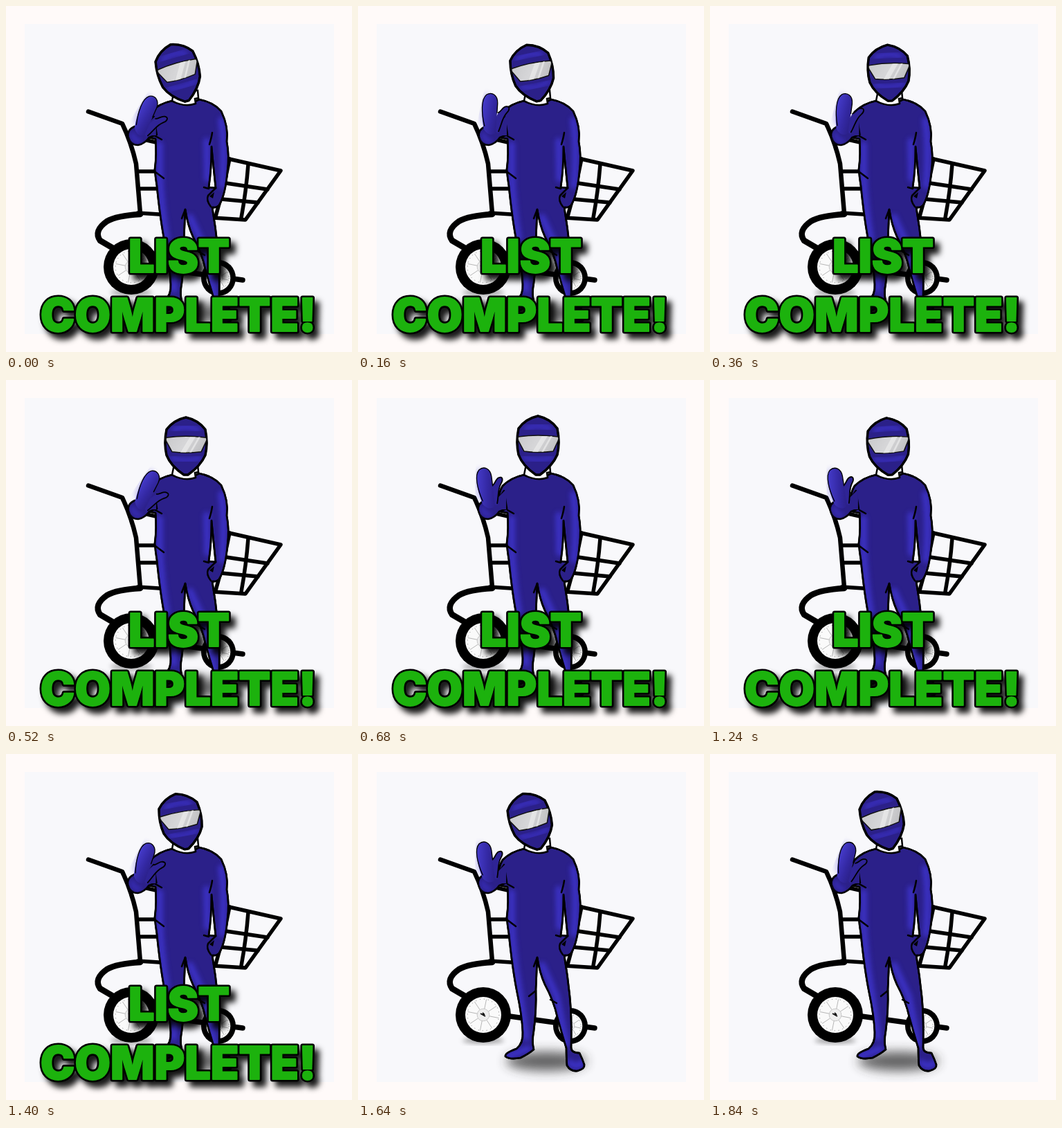
An HTML page for the animation above (1.88 s loop, 500 by 500 pixels).

```html
<!DOCTYPE html>
<html lang="en">
<head>
<meta charset="utf-8">
<title>List complete</title>
<style>
  html, body { margin: 0; width: 100%; height: 100%; overflow: hidden; background: #fffaf9; }
  svg { display: block; width: 100vw; height: 100vh; }
  .line { fill: none; stroke: #000; stroke-linecap: round; stroke-linejoin: round; }
  .suit { fill: #2b2089; stroke: #000; stroke-width: 2.6; stroke-linejoin: round; }
  .glow { fill: none; stroke: #4338dc; stroke-linecap: round; filter: url(#soft); }
  .caption { font: 900 66.5px Inter, "Open Sans", sans-serif; text-anchor: middle; stroke-linejoin: round; }
</style>
</head>
<body>
<svg viewBox="0 0 500 500">
  <defs>
    <filter id="soft" x="-50%" y="-50%" width="200%" height="200%"><feGaussianBlur stdDeviation="3.5"/></filter>
    <filter id="wide" x="-50%" y="-100%" width="200%" height="300%"><feGaussianBlur stdDeviation="8"/></filter>
    <filter id="drop" x="-10%" y="-10%" width="125%" height="130%">
      <feDropShadow dx="7" dy="8" stdDeviation="4" flood-color="#000" flood-opacity=".9"/>
    </filter>
    <linearGradient id="glass" x2="1" y2=".3">
      <stop offset="0" stop-color="#c9c9cb"/><stop offset=".55" stop-color="#d6d6d8"/><stop offset="1" stop-color="#c2c2c4"/>
    </linearGradient>
    <linearGradient id="skin" x2="1">
      <stop offset="0" stop-color="#453bcb"/><stop offset=".6" stop-color="#3328a2"/><stop offset="1" stop-color="#2b2089"/>
    </linearGradient>
    <path id="bodyShape" fill-rule="evenodd" clip-rule="evenodd" d="M240 137 Q221 141 209 153 Q202 164 203 180 L205 190 L216 192
      Q218 215 215 236 Q216 248 218 260 Q223 310 230 345 Q237 378 238 402 Q239 418 229 426
      Q212 432 213 437 Q219 442 235 439 Q247 433 254 427 Q251 416 254 400 Q258 370 257 340 L259 294
      Q263 318 270 333 Q283 357 288 380 Q294 402 301 425 Q301 440 302 450 Q307 459 317 458
      Q328 455 327 449 Q324 440 320 432 Q308 432 308 424 Q309 380 306 350 Q303 320 298 291
      Q306 292 309 286 Q317 272 320 239 Q323 216 319 196 Q322 175 311 152 Q300 139 279 135
      Q258 147 240 137Z M297 203 Q297 235 293 262 L303 263 Q300 235 297 203Z"/>
    <path id="headShape" d="M260 52 Q242 56 232 70 Q228 90 232 108 Q238 124 257 137 L263 137
      Q281 124 288 108 Q292 90 288 70 Q278 56 260 52Z"/>
    <clipPath id="bodyClip"><use href="#bodyShape"/></clipPath>
    <clipPath id="headClip"><use href="#headShape"/></clipPath>
    <g id="words">
      <text x="250" y="384.500">LIST</text>
      <text x="249" y="469.500">COMPLETE!</text>
    </g>
  </defs>

  <rect width="500" height="500" fill="#fffaf9"/>
  <rect x="27" y="26" width="447" height="448" fill="#f8f8fb"/>
  <ellipse cx="272" cy="444" rx="58" ry="14" fill="#333" opacity=".75" filter="url(#wide)"/>

  <g class="line" stroke-width="5.500">
    <path d="M119 152.500 L168 170 Q181 197 188 228 L194 300" stroke-width="6.500"/>
    <path d="M177 188 L397 238 L346 309 L190 299" stroke-width="5.500"/>
    <path d="M192 239 H220 M194 264 H220 M318 256 L378 265 M300 278 L364 284"/>
    <path d="M323 221 Q315 262 303 304 M350 229 Q347 268 340 306"/>
    <path d="M194 301 Q160 303 146 311 Q126 325 136 339 L160 353" stroke-width="8.500"/>
    <path d="M212 378 L342 396" stroke-width="7.500"/>
  </g>
  <ellipse cx="181" cy="414" rx="30" ry="4" opacity=".4" filter="url(#soft)"/>
  <g id="wheels"></g>

  <use href="#bodyShape" class="suit"/>
  <g clip-path="url(#bodyClip)">
    <path class="glow" stroke-width="9" d="M222 200 V240 Q224 290 232 335 L243 410 M290 195 L291 250 M266 305 L287 350 L301 420
      M311 165 Q317 205 312 260 M216 437 L246 426 M306 446 Q316 455 324 446" opacity=".75"/>
  </g>
  <use href="#bodyShape" fill="none" stroke="#000" stroke-width="2.600" class="line"/>
  <path class="line" stroke-width="2.500" d="M294 200 Q297 190 298 183 M303 263 L292 274 Q289 281 296 290
    M216 240 L228 249 M286 262 L293 264 M278 355 L287 360 M247 350 L257 342 M259 294 L254 307 M216 188 L225 193"/>
  <path d="M294 275 L301 269 L299 278 Z"/>
  <path d="M243 122 L240 137 Q258 147 274 141 L273 134 L278 133 L277 122Z" fill="#fff" stroke="#000" stroke-width="2.500"/>

  <g id="elbow">
    <path class="suit" d="M183 174 Q172 179 174 189 Q177 201 188 201 Q198 199 204 190 L215 186 L211 160 L202 173Z"/>
    <path d="M201 171 L214 158 L214 187 L202 187Z" fill="#2b2089"/>
    <path class="glow" stroke-width="6" d="M180 185 Q181 195 190 195" opacity=".6"/>
  </g>
  <g id="thumb">
    <path d="M188 178 L194 152 C197 150 198 143 202 141 C208 138 209 144 206 149 C201 158 203 168 202 181Z" fill="#2f2496"/>
    <path class="line" stroke-width="1.800" d="M194 152 C197 150 198 143 202 141 C208 138 209 144 206 149 C201 158 203 166 201 178"/>
  </g>
  <g id="palm">
    <path class="glow" stroke-width="6" opacity=".35" d="M178 172 Q168 145 175 131"/>
    <path d="M180 180 C172 160 167 138 174 130 C181 124 190 128 192 139 L194 153 L198 182 Q190 190 180 180Z" fill="url(#skin)"/>
    <path class="line" stroke-width="1.300" d="M180 175 C172 158 167 138 174 130 C181 124 190 128 192 139 L194 153"/>
  </g>

  <g id="head">
    <use href="#headShape" class="suit"/>
    <g clip-path="url(#headClip)">
      <path class="glow" stroke-width="8" d="M243 70 Q260 63 277 70" opacity=".65"/>
      <path class="glow" stroke-width="7" d="M240 112 Q260 119 280 112" opacity=".65"/>
    </g>
    <use href="#headShape" class="line" stroke-width="3.500"/>
    <path d="M232 82 Q260 78 289 82 Q291 84 289 88 L282 103 Q260 106 240 103 L232 88 Q230 84 232 82Z"
      fill="url(#glass)" stroke="#111" stroke-width="1.500"/>
    <path d="M266 81 L274 81 L260 104 L252 104Z M278 81 L281 81 L268 104 L265 104Z" fill="#eee" opacity=".65"/>
  </g>

  <g id="caption" class="caption" filter="url(#drop)">
    <use href="#words" stroke="#000" stroke-width="7"/>
    <use href="#words" fill="#1cb20d" stroke="#1cb20d" stroke-width="1.800"/>
  </g>
</svg>
<script>
  const LOOP = 1880, STEP = 40, WAVE = 480, CAPTION_END = 1520;
  const $ = id => document.getElementById(id);

  // Keys are [time in ms, value]; each curve closes on itself.
  const wave = [[50, 44], [205, 0], [250, -4], [360, 20], [440, 34]];
  const tilt = [[0, -16], [480, 0], [1080, 0], [1600, -16]];
  const squash = [[0, 0], [360, 4], [680, 0], [1000, 0], [1400, 4], [1640, 2], [1840, -1]];

  function curve(keys, period, time) {
    const n = keys.length, t = time % period;
    const key = i => {
      const turn = Math.floor(i / n), [at, value] = keys[i - turn * n];
      return [at + turn * period, value];
    };
    let i = n - 1;
    while (i >= 0 && keys[i][0] > t) i--;
    const [a, b, c, d] = [key(i - 1), key(i), key(i + 1), key(i + 2)];
    const slope = (p, q, r) =>
      (q[1] - p[1]) * (r[1] - q[1]) <= 0 ? 0 : (r[1] - p[1]) / (r[0] - p[0]);
    const span = c[0] - b[0], u = (t - b[0]) / span, v = 1 - u;
    return b[1] * v * v * (1 + 2 * u) + c[1] * u * u * (3 - 2 * u)
      + span * u * v * (slope(a, b, c) * v - slope(b, c, d) * u);
  }

  function wheel(x, y, rx, ry, hub) {
    let spokes = "";
    for (let i = 0; i < 8; i++) {
      const a = i * Math.PI / 4 + .2, c = Math.cos(a), s = Math.sin(a);
      spokes += `M${hub * .35 * c} ${hub * .35 * s}L${hub * .88 * c} ${hub * .88 * s}`;
    }
    return `<g transform="translate(${x} ${y})">
      <ellipse rx="${rx}" ry="${ry}"/>
      <g transform="scale(${rx / ry} 1)"><circle r="${hub}" fill="#fafafa"/>
      <circle r="${hub * .88}" fill="none" stroke="#777" stroke-dasharray="1 5"/>
      <path d="${spokes}" stroke="#999" stroke-width=".7"/>
      <circle r="${hub * .34}" fill="#eee" stroke="#aaa" stroke-width=".6"/>
      <path d="M-4 -2L3 2M-1 -3L2 0" stroke="#111" stroke-width="1.8"/></g></g>`;
  }
  $("wheels").innerHTML = wheel(181, 377, 40, 40, 26) + wheel(307, 393, 25, 26, 18);

  const move = (id, transform) => $(id).setAttribute("transform", transform);

  function draw(time) {
    const t = Math.floor(time % LOOP / STEP) * STEP;
    const swing = curve(wave, WAVE, t);
    move("thumb", `rotate(${swing} 190 188)`);
    move("palm", `rotate(${swing * .8} 190 188)`);
    move("elbow", `translate(${swing * .07} 0)`);
    const height = 1 - curve(squash, LOOP, t) / 86;
    move("head", `translate(0 137) scale(1 ${height}) translate(0 -137) rotate(${curve(tilt, LOOP, t)} 262 132)`);
    $("caption").style.display = t < CAPTION_END ? "" : "none";
  }

  const start = performance.now();
  function tick() {
    draw(performance.now() - start);
    requestAnimationFrame(tick);
  }
  tick();
</script>
</body>
</html>
```
